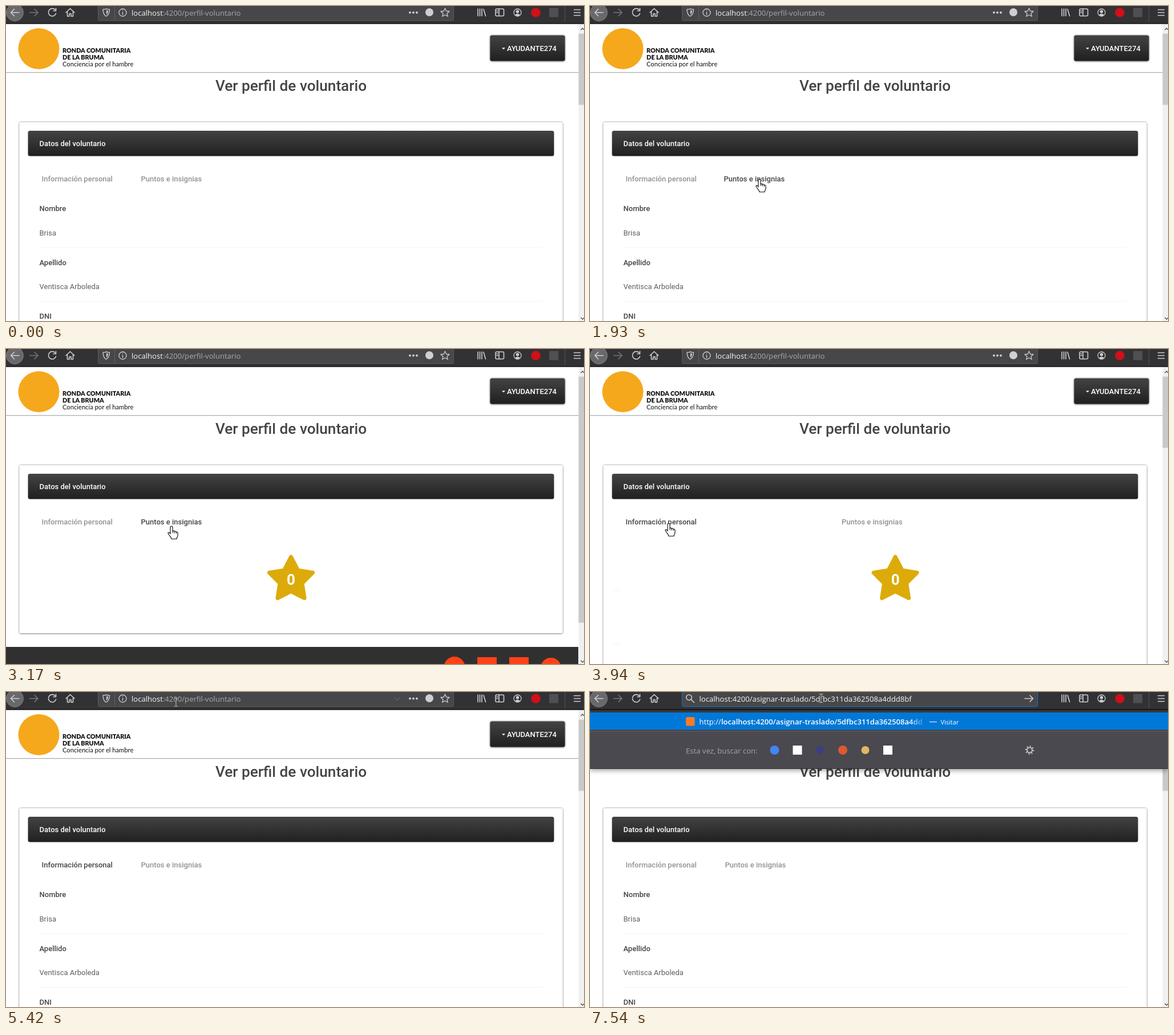
Recreate the animation shown at these times as an HTML page. Size 1013 by 553 pixels, loop 8000 ms.

```html
<!DOCTYPE html>
<html lang="es">
<head>
<meta charset="utf-8">
<title>Perfil de voluntario</title>
<style>
html, body { margin: 0; width: 100%; height: 100%; overflow: hidden; background: #fff; }
svg { display: block; width: 100%; height: 100%; }
text { font: 13px Roboto, sans-serif; white-space: pre; }
.ui { font: 13.1px "Open Sans", sans-serif; }
.medium { font-weight: 500; }
.brand { font: 900 10.8px Lato, sans-serif; fill: #111; }
.line { fill: none; stroke: #cfcfd1; stroke-width: 1.6; stroke-linecap: round; stroke-linejoin: round; }
.thin { stroke-width: 1.3; }
.dim { stroke: #77777a; }
#beam { mix-blend-mode: difference; }
</style>
</head>
<body>
<svg viewBox="0 0 1013 553">
  <defs>
    <linearGradient id="dark" x2="0" y2="1">
      <stop stop-color="#434343"/><stop offset="1" stop-color="#202020"/>
    </linearGradient>
    <linearGradient id="fade" x1="560" x2="590" y1="0" y2="0" gradientUnits="userSpaceOnUse">
      <stop stop-color="#fff"/><stop offset="1" stop-color="#fff" stop-opacity="0"/>
    </linearGradient>
    <filter id="shadow" x="-5%" y="-10%" width="110%" height="125%">
      <feDropShadow dx="0" dy=".4" stdDeviation="1.5" flood-opacity=".75"/>
    </filter>
    <filter id="deep" x="-2%" y="-10%" width="104%" height="130%">
      <feDropShadow dx="0" dy="3" stdDeviation="4" flood-opacity=".4"/>
    </filter>
    <clipPath id="pane"><rect x="39" y="325" width="922" height="228"/></clipPath>
  </defs>

  <rect width="1013" height="553" fill="#fff"/>

  <!-- page header -->
  <rect y="116" width="1003" height="1" fill="#b0b0b0"/>
  <rect y="117" width="1003" height="1" fill="#e6e6e6"/>
  <circle cx="57.5" cy="75" r="36" fill="#f5a81c"/>
  <text class="brand" x="99" y="81.5">RONDA COMUNITARIA</text>
  <text class="brand" x="99" y="93.5">DE LA BRUMA</text>
  <text class="brand" x="99" y="105.5" style="font-weight:400;font-size:11.2px">Conciencia por el hambre</text>
  <rect x="848.5" y="51.5" width="131" height="45" rx="3" fill="url(#dark)" filter="url(#shadow)"/>
  <path d="M869 73.2h6l-3 3z" fill="#fff"/>
  <text class="medium" x="878" y="79" fill="#fff">AYUDANTE274</text>
  <text class="medium" x="499.5" y="149" text-anchor="middle" fill="#444" style="font-size:26.2px">Ver perfil de voluntario</text>

  <!-- profile card -->
  <rect id="card" x="23.5" y="204" width="952" rx="3" fill="#fff" filter="url(#shadow)"/>
  <rect x="38.5" y="219" width="922" height="44.5" rx="3.5" fill="url(#dark)"/>
  <text class="medium" x="58.5" y="246" fill="#fff">Datos del voluntario</text>
  <text class="medium" id="tabInfo" x="62.5" y="308">Información personal</text>
  <text class="medium" id="tabPoints" y="308">Puntos e insignias</text>
  <g clip-path="url(#pane)">
    <g id="info">
      <g fill="#444">
        <text class="medium" x="58.5" y="360">Nombre</text>
        <text class="medium" x="58.5" y="455">Apellido</text>
        <text class="medium" x="58.5" y="549">DNI</text>
      </g>
      <g fill="#606060">
        <text x="58.5" y="403">Brisa</text>
        <text x="58.5" y="497">Ventisca Arboleda</text>
      </g>
      <path d="M59 424.5H940M59 518.5H940" stroke="#f4f4f4"/>
    </g>
    <g id="points">
      <polygon id="star" fill="#dcab0a" stroke="#dcab0a" stroke-width="7" stroke-linejoin="round"/>
      <text x="499.5" y="414" text-anchor="middle" fill="#fff" style="font-size:26px;font-weight:700">0</text>
    </g>
  </g>
  <g id="footer">
    <rect y="523" width="1003" height="30" fill="#303031"/>
    <g fill="#ff4217">
      <circle cx="786" cy="558.5" r="18.5"/>
      <rect x="826" y="541" width="34" height="34"/>
      <rect x="882" y="541" width="34" height="34"/>
      <circle cx="955" cy="560" r="18"/>
    </g>
  </g>

  <!-- scrollbar -->
  <rect x="1003.5" y="32" width="10" height="521" fill="#f0f0f0"/>
  <rect id="thumb" x="1003.5" y="48.5" width="10" fill="#c9c9c9"/>
  <path d="M1007.5 42l3-3 3 3M1007.5 547l3 3 3-3" fill="none" stroke="#555" stroke-width="1.5"/>

  <!-- address suggestions -->
  <g id="drop">
    <rect y="31" width="1013" height="103.5" fill="#4a4a4f" filter="url(#deep)"/>
    <rect y="31" width="1013" height="5" fill="#38383b"/>
    <rect y="36" width="1013" height="30" fill="#0078d7"/>
    <rect y="69" width="1013" height="1" fill="#5b5b60"/>
    <rect y="134" width="1013" height="1" fill="#2a2a2c"/>
    <rect x="168" y="44" width="15.5" height="15.5" rx="2" fill="#fb7a24"/>
    <text class="ui" x="191.5" y="56.5" fill="url(#fade)">http://<tspan font-weight="600">localhost:4200/asignar-traslado/5dfbc311da362508a4dd</tspan></text>
    <rect x="588" y="37" width="50" height="28" fill="#0078d7"/>
    <path d="M595 52.5h13" stroke="#fff"/>
    <text class="ui" x="614.5" y="56.5" fill="#fff" style="font-size:11px">Visitar</text>
    <text class="ui" x="168" y="108" fill="#a5a5a9">Esta vez, buscar con:</text>
    <circle cx="323.5" cy="102" r="8" fill="#4285f4"/>
    <rect x="355.5" y="94" width="16" height="16" fill="#fff"/>
    <circle cx="403" cy="102" r="7" fill="#3d3f80"/>
    <circle cx="443" cy="102" r="8" fill="#de5833"/>
    <circle cx="482.5" cy="102" r="7" fill="#e3b565"/>
    <rect x="514" y="94" width="16" height="16" fill="#fff"/>
    <g fill="none" stroke="#c4c4c6">
      <circle cx="770.5" cy="102" r="4.5" stroke-width="2"/>
      <circle cx="770.5" cy="102" r="6.7" stroke-width="2.4" stroke-dasharray="2 3.26"/>
    </g>
  </g>

  <!-- browser toolbar -->
  <rect width="1013" height="30.5" fill="#323234"/>
  <rect y="30" width="1013" height="1.6" fill="#101011"/>
  <circle cx="15.5" cy="11.5" r="15" fill="#69696b" stroke="#7b7b7d"/>
  <path class="line" d="M23 11.5H8.5M14.5 5.5l-6 6 6 6"/>
  <path class="line dim" d="M41.5 11.5H56M50 5.5l6 6-6 6"/>
  <path class="line" d="M86 6.5A6.7 6.7 0 1 0 87.5 13M87.5 4v4.5H83"/>
  <path class="line" d="M105 11.5l7.5-7 7.5 7M107.5 10.5V18h3.5v-4.5h3V18h3.5v-7.5"/>
  <rect id="field" x="161.5" y="-3" width="623" height="28.5" rx="2" fill="#474749"/>
  <g id="idle">
    <path class="line thin" d="M170 6q5.5 0 6-1.5 .5 1.5 5.5 1.5 0 9-6 12-5.500-3-5.500-12z"/>
    <path d="M176 7.500v7.500q2.800-2 3-6.800z" fill="#cfcfd1"/>
    <path d="M190.500 1v23" stroke="#626264"/>
    <circle class="line thin" cx="204.500" cy="11.500" r="6.500"/>
    <path class="line thin" d="M204.500 11v4M204.500 8v.1"/>
    <rect id="selection" x="220" y="1.500" width="191.500" height="20" fill="#fff"/>
    <text class="ui" x="220" y="17"><tspan id="host">localhost</tspan><tspan id="path">:4200/perfil-voluntario</tspan></text>
    <path id="chevron" class="line" d="M680.500 9.500l5 5 5-5"/>
    <g fill="#cfcfd1">
      <circle cx="708" cy="11.500" r="1.900"/><circle cx="714" cy="11.500" r="1.900"/><circle cx="720" cy="11.500" r="1.900"/>
      <circle cx="742" cy="11" r="7"/>
    </g>
    <path class="line thin" d="M769.500 4l2.300 5 5.200.5-4 3.600 1.200 5.200-4.700-2.800-4.700 2.800 1.200-5.200-4-3.600 5.200-.5z"/>
  </g>
  <g id="typed">
    <circle class="line" cx="173.500" cy="9.500" r="4.700"/>
    <path class="line" d="M177 13l5.500 5.500M762 11.500h14.500M771 6l5.500 5.500-5.500 5.500"/>
    <text class="ui" x="191.500" y="17" fill="#f5f5f6">localhost:4200/asignar-traslado/5dfbc311da362508a4ddd8bf</text>
  </g>
  <path class="line" d="M827 5v12.500M830.500 5v12.500M834 5v12.500M837 5.500l3.500 12"/>
  <rect class="line" x="858" y="5" width="14.500" height="12.500" rx="2"/>
  <path class="line" d="M864 5v12.500M860 8.500h2M860 11.500h2"/>
  <circle class="line thin" cx="896.500" cy="11.500" r="6.500"/>
  <path d="M892 15.500q4.500-4 9 0-4.500 4-9 0z" fill="#cfcfd1"/>
  <circle cx="896.500" cy="9.800" r="2.700" fill="#cfcfd1"/>
  <circle cx="928.500" cy="11.500" r="8.300" fill="#cf1018"/>
  <rect x="952" y="3.500" width="16" height="16" fill="#505052"/>
  <path d="M979.500 0v28" stroke="#555558"/>
  <path class="line" d="M995.500 6.500h11M995.500 11.500h11M995.500 16.500h11"/>

  <!-- pointers, hot spot at 0,0 -->
  <path id="arrow" d="M0 0V16.500l3.800-3.700 2.500 5.900 2.700-1.100-2.500-5.800H12z" fill="#fff" stroke="#111"/>
  <g id="hand">
    <path d="M-2 2C-2-.6 2-.6 2 2V9C2.500 7.500 5 8 5 9.500 6 8.300 8.300 9 8.300 10.700 9.500 9.800 11 10.500 11 12.300V16C11 19 9 20 9 22.500H0C0 20-3 17.500-5.500 13.500-7 11-4.500 10-2 13z" fill="#fff" stroke="#14141e" stroke-width="1.200"/>
    <path d="M2 9v3M5 10v2.500M8.300 11v2" stroke="#14141e"/>
  </g>
  <path id="beam" d="M-3.500-7.500h2.500l1 1 1-1h2.500M0-6.500V6.500M-3.500 7.500h2.500l1-1 1 1h2.500" fill="none" stroke="#fff" stroke-width="1.200"/>
</svg>
<script>
const LOOP = 8000, STEP = 77.7, PANE = 922;
const $ = id => document.getElementById(id);
const set = (id, attrs) => { for (const key in attrs) $(id).setAttribute(key, attrs[key]); };
const show = (id, on) => set(id, { display: on ? 'inline' : 'none' });
const within = (t, from, to) => t >= from && t < to;

// time, x, y of the pointer
const route = [
  [530, 802, 452], [700, 672, 345], [860, 540, 240], [960, 455, 200], [1110, 365, 225], [1310, 297, 304],
  [2600, 297, 304], [2770, 290, 311], [3200, 290, 311], [3440, 218, 312], [3700, 138, 306],
  [4180, 138, 306], [4650, 192, 338], [4730, 196, 335], [5050, 235, 200], [5400, 296, 20],
  [5510, 302, 14], [5580, 305, 11], [6190, 308, 11], [6450, 405, 11]
];

function pointerAt(t) {
  const next = route.findIndex(stop => stop[0] > t);
  if (next < 0) return route[route.length - 1].slice(1);
  if (next === 0) return route[0].slice(1);
  const [t0, x0, y0] = route[next - 1], [t1, x1, y1] = route[next];
  const part = (t - t0) / (t1 - t0);
  return [x0 + (x1 - x0) * part, y0 + (y1 - y0) * part];
}

// cubic-bezier(.35, 0, .25, 1), solved by bisection
function ease(x) {
  if (x <= 0) return 0;
  if (x >= 1) return 1;
  let low = 0, high = 1, s;
  for (let i = 0; i < 24; i++) {
    s = (low + high) / 2;
    const at = 1.05 * s * (1 - s) ** 2 + 0.75 * s * s * (1 - s) + s ** 3;
    if (at < x) low = s; else high = s;
  }
  return s * s * (3 - 2 * s);
}

function drawPointer(t, q) {
  const [x, y] = pointerAt(q);
  const overTab = y > 294 && y < 326 && (within(x, 50, 211) || within(x, 212, 372));
  const kind = t < 530 ? '' : y < 26 ? 'beam' : overTab ? 'hand' : 'arrow';
  for (const id of ['arrow', 'hand', 'beam']) {
    show(id, id === kind);
    set(id, { transform: `translate(${Math.round(x)} ${Math.round(y)})` });
  }
}

function draw(t) {
  const q = Math.floor((t + 25) / STEP) * STEP;
  const slide = ease((q - 1980) / 500) - ease((q - 3909) / 500);
  set('info', { transform: `translate(${-PANE * slide})` });
  set('points', { transform: `translate(${PANE * (1 - slide)})` });

  const short = within(t, 2540, 3870);
  set('card', { height: short ? 295 : 400 });
  set('thumb', { height: short ? 432 : 125 });
  show('footer', short);

  const tabX = within(t, 1770, 2690) ? 234.5 : within(t, 3700, 4650) ? 441 : 236.5;
  set('tabInfo', { fill: within(t, 3700, 5740) ? '#444' : '#929292' });
  set('tabPoints', { x: tabX, fill: within(t, 1770, 3700) ? '#444' : '#929292' });

  const focused = t >= 5740, selected = t >= 5820, pasted = t >= 7470;
  set('field', { stroke: focused ? '#0a78d1' : '#5c5c5e' });
  show('selection', selected);
  set('host', { fill: selected ? '#0078d7' : '#f5f5f6' });
  set('path', { fill: selected ? '#0078d7' : focused ? '#f5f5f6' : '#aaaaac' });
  set('chevron', { opacity: t < 5400 ? 0 : t < 5500 ? 0.15 : 0.9 });
  show('idle', !pasted);
  show('typed', pasted);
  show('drop', pasted);
  drawPointer(t, q);
}

set('star', {
  points: Array.from({ length: 10 }, (_, i) => {
    const r = i % 2 ? 20.5 : 40, a = i * Math.PI / 5;
    return `${499.5 + r * Math.sin(a)},${405 - r * Math.cos(a)}`;
  }).join(' ')
});

const start = performance.now();
function tick() {
  draw((performance.now() - start) % LOOP);
  requestAnimationFrame(tick);
}
draw(0);
requestAnimationFrame(tick);
</script>
</body>
</html>
```
